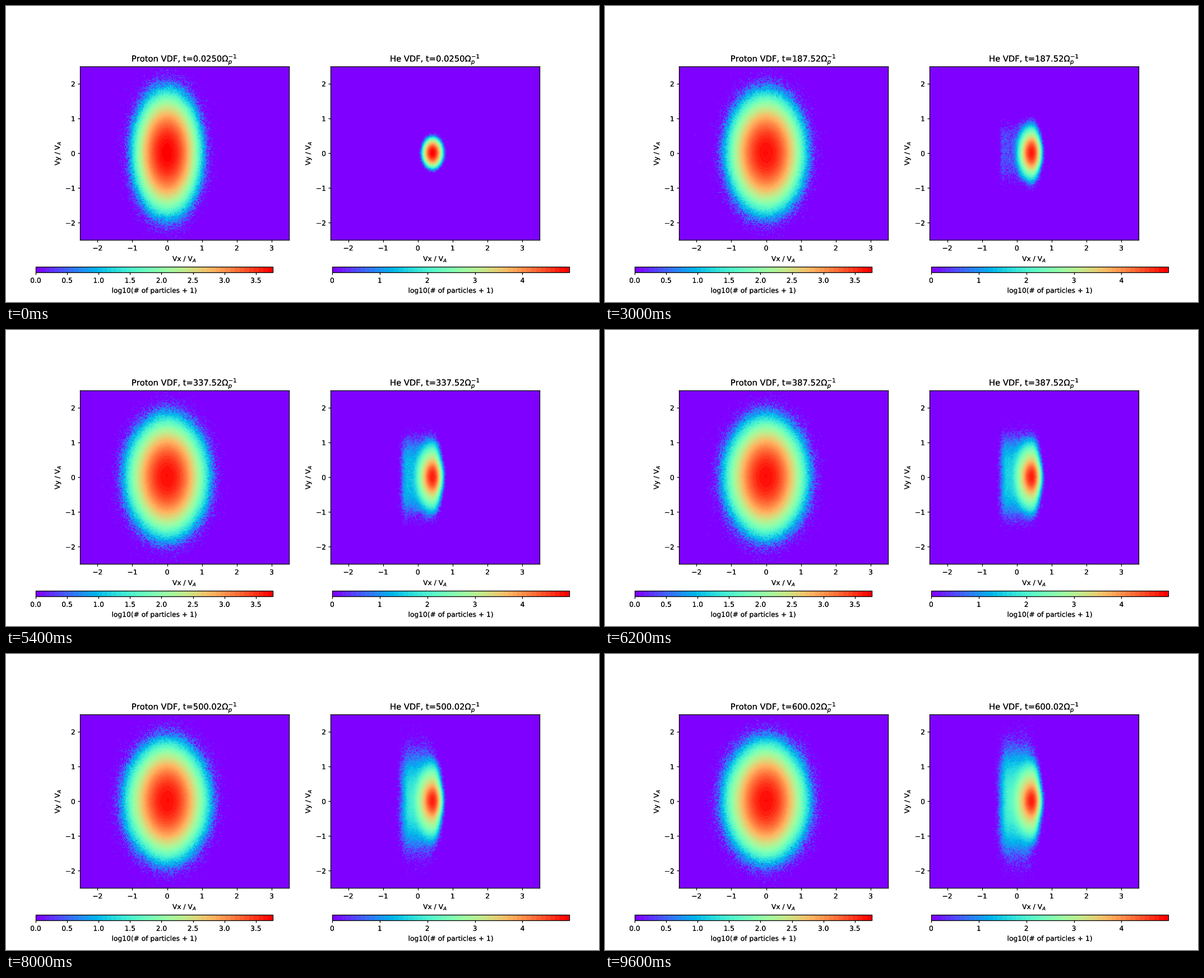
A matplotlib script for the animation above (9.8 s loop, 1058x529 px).

```python
import matplotlib.pyplot as plt
import numpy as np
from matplotlib.animation import FuncAnimation
from matplotlib.patheffects import Normal
from matplotlib.text import Text

FRAMES, INTERVAL = 49, 200
DPI = 92
K = 1058 / 12 / DPI  # keeps default text and line sizes for a 12 x 6 inch layout
BINS = 200
EXTENT = (-2.5, 3.5, -2.5, 2.5)

plt.rcParams.update({
    "font.family": "DejaVu Sans",
    "font.size": 10 * K,
    "axes.titlesize": 12 * K,
    "axes.titlepad": 6 * K,
    "axes.labelpad": 4 * K,
    "axes.linewidth": 1.05 * K,
    "toolbar": "None",
})
for axis in ("xtick", "ytick"):
    plt.rcParams.update({
        f"{axis}.major.size": 3.5 * K,
        f"{axis}.major.width": 1.05 * K,
        f"{axis}.major.pad": 3.5 * K,
    })


def centers(low, high):
    step = (high - low) / BINS
    return low + step * (np.arange(BINS) + 0.5)


X, Y = np.meshgrid(centers(-2.5, 3.5), centers(-2.5, 2.5))


def relax(t, tau):
    return 1 - np.exp(-t / tau)


def gauss(x, sx, y, sy):
    return np.exp(-0.5 * ((x / sx) ** 2 + (y / sy) ** 2))


def proton_density(t):
    inner = 0.29 + 0.04 * relax(t, 50)
    outer = 0.29 + 0.068 * relax(t, 180)
    blend = 1 / (1 + np.exp(-(np.abs(X) - 0.85) / 0.12))
    sx = inner + (outer - inner) * blend
    sy = 0.525 - 0.018 * relax(t, 150)
    return 5650 * 0.29 / inner * gauss(X, sx, Y, sy)


def helium_density(t):
    # Drifting core: a compact part inside wings that stretch up and left
    dx = X - 0.43
    right = 0.078

    def lobe(left, sy):
        return gauss(dx, np.where(dx < 0, left, right), Y, sy)

    sy = 0.115 + 0.06 * relax(t, 100)
    share = 0.15 * relax(t, 200)
    peak = 92000 * 0.115 / sy
    core = peak * ((1 - share) * lobe(right + 0.015 * relax(t, 200), sy)
                   + share * lobe(right + 0.11 * relax(t, 300),
                                  0.115 + 0.235 * relax(t, 250)))

    # Scattered plateau that fills in and spreads with time
    times = [0, 87, 187, 287, 387, 500, 600]
    level = 10 ** np.interp(t, times, [-4, -1.6, 0.4, 1.1, 1.55, 1.9, 2.1])
    height = np.interp(t, times, [0.5, 0.55, 0.7, 0.82, 0.8, 0.77, 0.82])
    power = np.interp(t, [187, 500], [4, 2])
    growth = np.interp(t, [187, 500], [0, 1])
    soft = 0.06 + 0.11 * growth
    x0 = -0.4 + growth * (0.23 - 0.06 * np.minimum(np.abs(Y), 1))
    x1 = 0.35 - 0.1 * growth
    outside = np.maximum(np.maximum(x0 - X, X - x1), 0)
    tail = level * np.exp(-(outside / soft) ** 2
                          - (np.abs(Y) / height) ** power)
    return core + tail


def counts(density, t, seed):
    rng = np.random.default_rng(seed)
    return np.log10(rng.poisson(density(t)) + 1)


fig = plt.figure(figsize=(11.5, 5.75), dpi=DPI, facecolor="white")
cmap = plt.get_cmap("rainbow").resampled(50)


def make_panel(left, bar_left, vmax, bar_ticks):
    width = 0.775 / 2.2
    ax = fig.add_axes([left, 1 - 418.4 / 529, width, 310.6 / 529])
    image = ax.imshow(np.zeros((BINS, BINS)), origin="lower", extent=EXTENT,
                      aspect="auto", cmap=cmap, vmin=0, vmax=vmax)
    ax.set_xticks(range(-2, 4))
    ax.set_yticks(range(-2, 3))
    ax.set_xlabel("Vx / V$_A$")
    ax.set_ylabel("Vy / V$_A$")
    cax = fig.add_axes([bar_left, 0.1, 0.4, 0.02])
    bar = fig.colorbar(image, cax=cax, orientation="horizontal",
                       ticks=bar_ticks)
    bar.set_label("log10(# of particles + 1)")
    return ax, image


panels = [
    ("Proton", proton_density,
     *make_panel(0.125, 0.05, 3.77, np.arange(0, 3.6, 0.5))),
    ("He", helium_density,
     *make_panel(0.9 - 0.775 / 2.2, 0.55, 4.985, range(5))),
]

# Painting the glyphs twice gives the heavier lettering
for text in fig.findobj(Text):
    text.set_path_effects([Normal(), Normal()])


def update(frame):
    t = 0.025 + 12.5 * frame
    stamp = f"{t:.4f}"[:6]
    for k, (name, density, ax, image) in enumerate(panels):
        image.set_data(counts(density, t, 2 * frame + k))
        ax.set_title(f"{name} VDF, t={stamp}" + r"$\Omega_p^{-1}$")
    return [panel[3] for panel in panels]


anim = FuncAnimation(fig, update, frames=FRAMES, interval=INTERVAL,
                     repeat=True, repeat_delay=0, blit=False)
plt.show()
```
